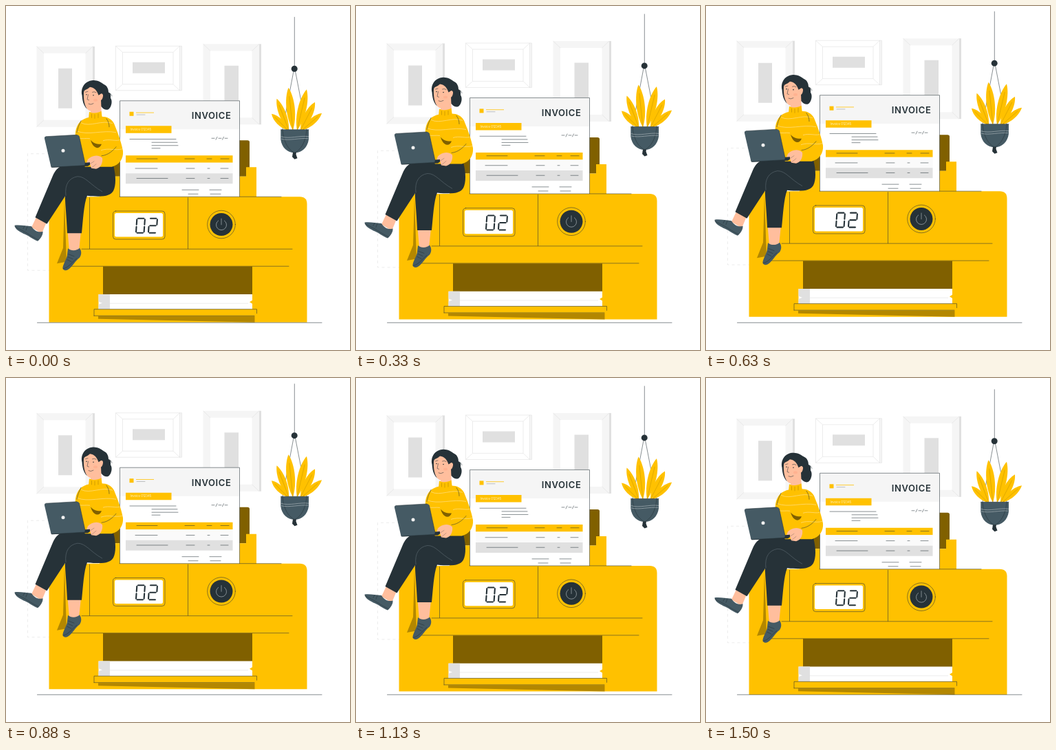
These frames come from a looping animation (500x500 px, 1540 ms). An HTML page:

```html
<!DOCTYPE html>
<html lang="en">
<head>
<meta charset="utf-8">
<title>Invoice printer</title>
<style>
html, body { margin: 0; width: 100%; height: 100%; overflow: hidden; background: #fff; }
svg { display: block; width: 100%; height: 100%; }
.y { fill: #ffc100; }
.d { fill: #263238; }
.s { fill: #455a64; }
.g { fill: #e0e0e0; }
.p { fill: #f5f5f5; }
.w { fill: #fff; }
.b { fill: #806000; }
.sh { fill: #b38700; }
.skin { fill: #ffbe9d; }
.l { fill: none; stroke: #263238; stroke-width: .55; stroke-linecap: round; stroke-linejoin: round; }
.gl { fill: none; stroke: #e0e0e0; stroke-width: .6; }
</style>
</head>
<body>
<svg viewBox="0 0 500 500" xmlns="http://www.w3.org/2000/svg">
<g id="scene">
  <path class="gl" stroke-dasharray="4 4" d="M64 215H31.500V384.500H64"/>

  <g id="frames">
    <path class="p" d="M44.500 59H126V176H44.500Z"/>
    <path class="g" d="M126 59H129V176H126Z"/>
    <path class="w" d="M55 69H115.500V166H55Z"/>
    <path class="gl" d="M44.500 59L55 69M126 59L115.500 69M44.500 176L55 166M126 176L115.500 166"/>
    <path class="g" d="M76 91H96V149H76Z"/>

    <path class="w" d="M159.500 58.500H252.500V123H159.500Z"/>
    <path class="p" d="M252.500 58.500H255.500V123H252.500Z"/>
    <path class="gl" d="M159.500 58.500H255.500V123H159.500ZM252.500 58.500V123M169.500 67.500H243V114H169.500ZM159.500 58.500L169.500 67.500M252.500 58.500L243 67.500M159.500 123L169.500 114M252.500 123L243 114"/>
    <path class="g" d="M184 82H231V98H184Z"/>

    <path class="p" d="M286.500 55.500H368V172.500H286.500Z"/>
    <path class="g" d="M368 55.500H371V172.500H368Z"/>
    <path class="w" d="M297 65.500H357.500V162.500H297Z"/>
    <path class="gl" d="M286.500 55.500L297 65.500M368 55.500L357.500 65.500M368 172.500L357.500 162.500"/>
    <path class="g" d="M317.500 87H338V145H317.500Z"/>
  </g>

  <g id="plant">
    <path class="l" d="M419.300 16.500V92M418 95L402 180M420.500 95L437 180"/>
    <circle class="d" cx="419.200" cy="91.500" r="4.500"/>
    <g id="leaves"></g>
    <path class="s" d="M399.300 180H440V194C438.500 206 430 213.500 419.700 213.500C409 213.500 400.500 206 399.300 194Z"/>
    <path class="l" d="M399.500 180H440M402 180C403 198 411 210 419.500 213.500C428 210 436 198 437 180"/>
    <path fill="none" stroke="#b5bec2" stroke-width=".6" d="M399.500 190C412 194 427 188 440 190M400 193.500C412 196.500 427 191.500 439.500 193"/>
    <path class="d" d="M417 213H422L421.500 216L423.500 221.500L419.500 223L416 219.500Z"/>
  </g>

  <g id="rear">
    <path class="b" d="M146 248V198Q146 195.500 149 195.500H351Q354 195.500 354 198V248Z"/>
    <path class="y" d="M136 234.500H151V248H349V234.500H364V279H136Z"/>
  </g>

  <g id="invoice">
    <path class="w" d="M165.500 138H339.500V279H165.500Z"/>
    <path class="p" d="M165.500 138H339.500V179.500H165.500Z"/>
    <path class="l" d="M165.500 279V138H339.500V279"/>
    <path class="y" d="M179.500 154H185.500V160H179.500Z"/>
    <path stroke="#ffc100" stroke-width=".8" d="M189 155.300H215"/>
    <path class="l" stroke-opacity=".5" d="M190 158.300H202"/>
    <text class="d" x="269.800" y="164.500" font-family="Inter, sans-serif" font-weight="600" font-size="13" letter-spacing=".6">INVOICE</text>
    <path class="y" d="M174 174.500H240.500V185H174ZM174 217.500H329.500V228H174Z"/>
    <text x="180.500" y="181.300" font-family="Inter, sans-serif" font-size="4.300" fill="#fff3cc">Invoice 012345</text>
    <path fill="#fafafa" d="M174 228H329.500V243.500H174Z"/>
    <path class="g" d="M174 243.500H329.500V258.500H174Z"/>
    <path id="rules" class="l"/>
  </g>

  <g id="printer">
    <path class="y" d="M62.500 460V288Q62.500 277.500 73 277.500H427Q437.500 277.500 437.500 288V460Z"/>
    <path class="l" d="M165 277.500H400M121.500 279V353M264.500 279V353M110 353.500H416M86 378.500H411"/>
    <path class="b" d="M141 378.800H358V420H141Z"/>
    <path class="w" d="M134.500 419.300H358V428L354 430.500L358 433V441H134.500Z"/>
    <path class="g" d="M134.500 419.300H151V441H134.500V434L140 432L134.500 430Z"/>
    <path class="gl" d="M151 432.500H352"/>
    <path class="sh" d="M134 451H361.500V460L134 455Z"/>
    <path class="y" d="M128 441H364.500V450.500H128Z"/>
    <path class="l" d="M128 450.500V441H364.500V447M128 450.500H361"/>

    <rect class="l" x="155.500" y="298.300" width="75.500" height="41" rx="4"/>
    <rect class="w" x="158" y="301.300" width="70" height="34.500" rx="2.500"/>
    <path id="digits" class="d" transform="translate(22.300 0) skewX(-4)"/>

    <circle class="l" cx="313" cy="317.800" r="20.300"/>
    <circle class="d" cx="313" cy="317.800" r="16.500"/>
    <path fill="none" stroke="#aab2b6" stroke-width=".7" d="M313 309V318.500M309 312A7.500 7.500 0 1 0 317 312"/>
  </g>

  <g id="woman">
    <path class="sh" d="M85 283L88 372L74 374.500L83 352Z"/>

    <path class="skin" d="M46 303L60 312L52 331L37 322Z"/>
    <path class="s" d="M12.500 319C20 318 29 320 37 320.500C41 327 47 330 53.500 328C54 333 50 339 46 342C38 339 32 333 25 331C20 328 13 325 12.500 319Z"/>
    <path class="l" d="M13 321C22 326 27 328 33 332C39 336 43 338 47 340M27 320L25 324M31 321L29 326"/>
    <path class="skin" d="M89.500 327H109L106 357H92Z"/>
    <path class="s" d="M90 352.500C95 357 103 356 107 352C110 357 110 361 107 366C100 371 97 379 90 383.500C87 385.500 82 384.500 82.500 380C84 373 89 367 89 361Z"/>
    <path class="l" d="M83 382C91 381 96 372 103 367M90 365L97 368M89 369L95 372M91 361L99 364"/>

    <path class="d" d="M82 232C75 235 71 240 68 247L42.500 307.500L59.500 317L89 272L130 240Z"/>
    <path class="d" d="M80 233L156 232C160 247 160 261 156 269C151 277 141 278 118 276C113 288 112 312 110 330.500H89C88 302 85 282 86 268C87 256 94 249 106 247Z"/>
    <path fill="none" stroke="#56646b" stroke-width=".7" d="M87 276C85 259 92 250 104 248C116 248 122 260 140 270"/>

    <path class="y" d="M121 162C110 164 103 171 101 183L99 215L115 234L154 234C165 231 171 222 170 211C167 195 161 181 157 171C153 164 147 161 139 161Z"/>
    <path fill="none" stroke="#ffe08a" stroke-width=".7" d="M109 170C122 177 140 165 155 171M103 182C119 189 141 180 160 184M104 192C111 194 116 192 122 193M141 196C150 193 159 197 165 195M138 210C150 206 159 211 169 208"/>
    <path class="b" d="M123 195C128 201 133 201 139 201C137 206 133 208 129 205C126 203 124 199 123 195Z"/>
    <path class="l" d="M139 218C149 217 156 210 160 205M146 164C149 168 150 172 150 176M109 167C106 173 104 178 103 184"/>

    <path class="d" d="M110.500 130C108 119 115 109.500 125 108.500C132 107.500 138 111 142 114C147 116 149 121 149 126C153 127 152 131 152 134C155 138 153.500 146 150 149.500C147 152.500 142 151 139 147L134 143L115 128C116 137 114 142 118 150C112 145 111 136 110.500 130Z"/>
    <path class="skin" d="M123 139L138 136L139 160H123Z"/>
    <path class="y" d="M121 154C127 157 133 156 138.500 153L140 164C133 167 126 167 120 164Z"/>
    <path fill="none" stroke="#b38700" stroke-width=".6" d="M124.500 157V163M129 157.500V164M134 156.500V163"/>
    <path class="skin" d="M113 127C113 121 119 117 125 117C130 119 134 123 136 129C138 126.500 141.500 127.500 141 131C140.500 136 138 138 136 138C135 147 129 153 123 153C115 151 112.500 138 113 127Z"/>
    <path class="d" d="M111.500 126C113 122 118 122 122 118C129 119 132 123 134.500 130L139 127L138 115L125 109C116 111 111 117 111.500 126Z"/>
    <path class="l" d="M115.500 125.500L119 124.500M125.500 125.500Q128 124 131 126M119.500 129L118 136L120.500 137M120 142.500Q123 144.500 127 142M139 143C143 146 149 145 151 140M149 126Q153 127 154 131"/>
    <circle class="d" cx="117" cy="129" r=".8"/>
    <circle class="d" cx="127" cy="130" r=".8"/>
    <ellipse cx="130" cy="137" rx="3" ry="2" fill="#ff9f7c" opacity=".35"/>

    <path class="skin" d="M140 221C133 215 124 218 119 223L117 228L122 230L124 236L131 237C138 235 141 228 140 221Z"/>
    <path class="l" stroke-opacity=".5" d="M122 230L128 226M125 235L131 230"/>
    <path class="d" d="M65 232L122 227.500V231L119 233L66 235Z"/>
    <path class="s" d="M58 190L103 187.500Q106 187.500 106.500 190L115 229Q115.500 231.500 113 232L68 234.500Q65.500 234.500 65 232L56 193Q55.500 190 58 190Z"/>
    <path class="l" d="M106.500 190L115 229Q115.500 231.500 113 232L68 234.500M58 190L103 187.500"/>
    <circle cx="83" cy="210.500" r="2.500" fill="#f0f0f0"/>
  </g>
</g>
<path class="l" d="M45.500 460.300H459"/>
</svg>
<script>
const el = id => document.getElementById(id);

// Horizontal pen strokes on the invoice: y, then start/end pairs.
const rules = [
  [193.8, 180, 247], [198.5, 212, 249], [203, 212, 250], [207, 212, 224],
  [192.5, 299, 303, 309, 313, 318, 322],
  [222.3, 190, 220, 260, 274, 292, 299, 312, 324],
  [236.3, 188, 220, 262, 274, 293, 296, 312, 323],
  [250.8, 190, 235, 262, 274, 293, 296, 312, 323],
  [267.5, 256, 280, 296, 313], [273.5, 265, 279, 297, 312]
];
let d = "M305 194.500L307 190.500M314.500 194.500L316.500 190.500";
for (const [y, ...xs] of rules)
  for (let i = 0; i < xs.length; i += 2) d += `M${xs[i]} ${y}H${xs[i + 1]}`;
el("rules").setAttribute("d", d);

// Seven-segment digits
const bar = (x, y) => `M${x} ${y}l1.050 -1.050h8.900l1.050 1.050l-1.050 1.050h-8.900z`;
const post = (x, y) => `M${x} ${y}l1.050 1.050v7.900l-1.050 1.050l-1.050 -1.050v-7.900z`;
const segs = {
  a: x => bar(x + 1.5, 309), g: x => bar(x + 1.5, 319.5), d: x => bar(x + 1.5, 330),
  f: x => post(x + 1.2, 309.3), b: x => post(x + 12.8, 309.3),
  e: x => post(x + 1.2, 319.8), c: x => post(x + 12.8, 319.8)
};
const digit = (x, on) => [...on].map(k => segs[k](x)).join("");
el("digits").setAttribute("d", digit(188.5, "abcdef") + digit(206.5, "abged"));

// A leaf from the pot rim at bx to its tip (x, y), w is its half width.
const leaf = (bx, x, y, w) => {
  const by = 181, dx = x - bx, dy = y - by, len = Math.hypot(dx, dy);
  const at = (t, side) =>
    `${bx + dx * t - dy / len * side * w * 1.35} ${by + dy * t + dx / len * side * w * 1.35}`;
  return `<path class="y" d="M${bx} ${by}C${at(.3, 1)} ${at(.75, 1)} ${x} ${y}C${at(.75, -1)} ${at(.3, -1)} ${bx} ${by}Z"/>` +
    `<path d="M${bx} ${by}L${at(.8, 0)}" stroke="#b38700" stroke-width=".4"/>`;
};
el("leaves").innerHTML = [
  [410, 386, 157, 4.5], [430, 459, 156, 4.5], [411, 393.5, 135, 5],
  [428, 449, 140, 5.5], [423, 437, 121.5, 6], [417, 410.5, 119, 6]
].map(v => leaf(...v)).join("");

const LOOP = 1540, STEPS = 37, LIFT = 10, REST = .3;

function draw(ms) {
  const step = Math.min(STEPS - 1, Math.floor(ms % LOOP * .024 + .2));
  const phase = (step + 1) / STEPS % 1;
  const y = REST - LIFT * (1 - Math.abs(1 - 2 * phase));
  el("scene").setAttribute("transform", `translate(0 ${y.toFixed(3)})`);
}

const start = performance.now();
function tick() {
  draw(performance.now() - start);
  requestAnimationFrame(tick);
}
tick();
</script>
</body>
</html>
```
